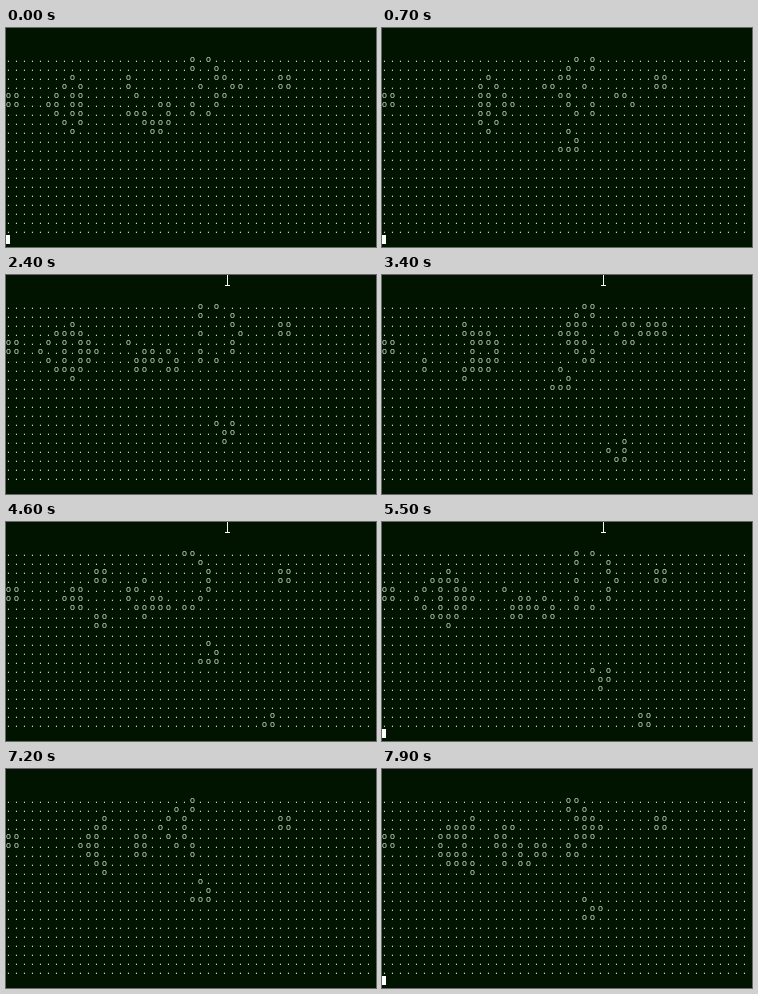
Write an HTML page with a canvas that moves like this. It is 370 by 219 pixels and loops after 8000 ms.

```html
<!DOCTYPE html>
<html lang="en">
<head>
<meta charset="utf-8">
<title>Glider gun in a terminal</title>
<style>
  html, body { margin: 0; width: 100%; height: 100%; overflow: hidden; background: #001400; }
  canvas { display: block; width: 370px; height: 219px; }
</style>
</head>
<body>
<canvas id="term" width="370" height="219"></canvas>
<script>
const COLS = 46, ROWS = 20, CELL_W = 8, CELL_H = 9, TOP = 27;
const STEP = 100, STEPS = 80, LAST_GEN = 98;
const BG = '#001400', INK = '#c4d6be', WHITE = '#ffffff';

const GUN = [
  '........................o',
  '......................o.o',
  '............oo......oo............oo',
  '...........o...o....oo............oo',
  'oo........o.....o...oo',
  'oo........o...o.oo....o.o',
  '..........o.....o.......o',
  '...........o...o',
  '............oo'
];

const ctx = document.getElementById('term').getContext('2d');

function seed() {
  return Array.from({ length: ROWS }, (_, r) =>
    Array.from({ length: COLS }, (_, c) => (GUN[r] || '')[c] === 'o' ? 1 : 0));
}

// Cells beyond the edge count as dead.
function evolve(grid) {
  const at = (r, c) => (grid[r] && grid[r][c]) || 0;
  return grid.map((row, r) => row.map((alive, c) => {
    let sum = -alive;
    for (let dr = -1; dr <= 1; dr++)
      for (let dc = -1; dc <= 1; dc++) sum += at(r + dr, c + dc);
    return sum === 3 || (alive && sum === 2) ? 1 : 0;
  }));
}

const history = [seed()];
while (history.length <= LAST_GEN) history.push(evolve(history[history.length - 1]));

// One generation per step, with a jump at the start and a few stalls.
function generationAt(n) {
  if (n === 0) return 12;
  return 21 + n - (n >= 4) - (n >= 27) - (n === 67);
}

function drawPointer() {
  ctx.fillStyle = WHITE;
  ctx.fillRect(221, 0, 1, 11);
  ctx.fillRect(219, 10, 2, 1);
  ctx.fillRect(222, 10, 2, 1);
}

function draw(n) {
  const gen = generationAt(n);
  ctx.fillStyle = BG;
  ctx.fillRect(0, 0, 370, 219);

  ctx.fillStyle = INK;
  ctx.font = '9px "DejaVu Sans Mono", monospace';
  ctx.textAlign = 'center';
  ctx.textBaseline = 'alphabetic';
  history[gen].forEach((row, r) => row.forEach((alive, c) =>
    ctx.fillText(alive ? 'o' : '.', c * CELL_W + 2.5, TOP + r * CELL_H + 7)));

  if ((gen + 1) % 12 < 6) {
    ctx.fillStyle = WHITE;
    ctx.fillRect(0, TOP + ROWS * CELL_H, 4, CELL_H);
  }
  if (n >= 9 && n < 65) drawPointer();
}

let shown = -1;
const start = performance.now();
function tick() {
  const n = Math.floor((performance.now() - start) / STEP) % STEPS;
  if (n !== shown) draw(shown = n);
  requestAnimationFrame(tick);
}
tick();
</script>
</body>
</html>
```
